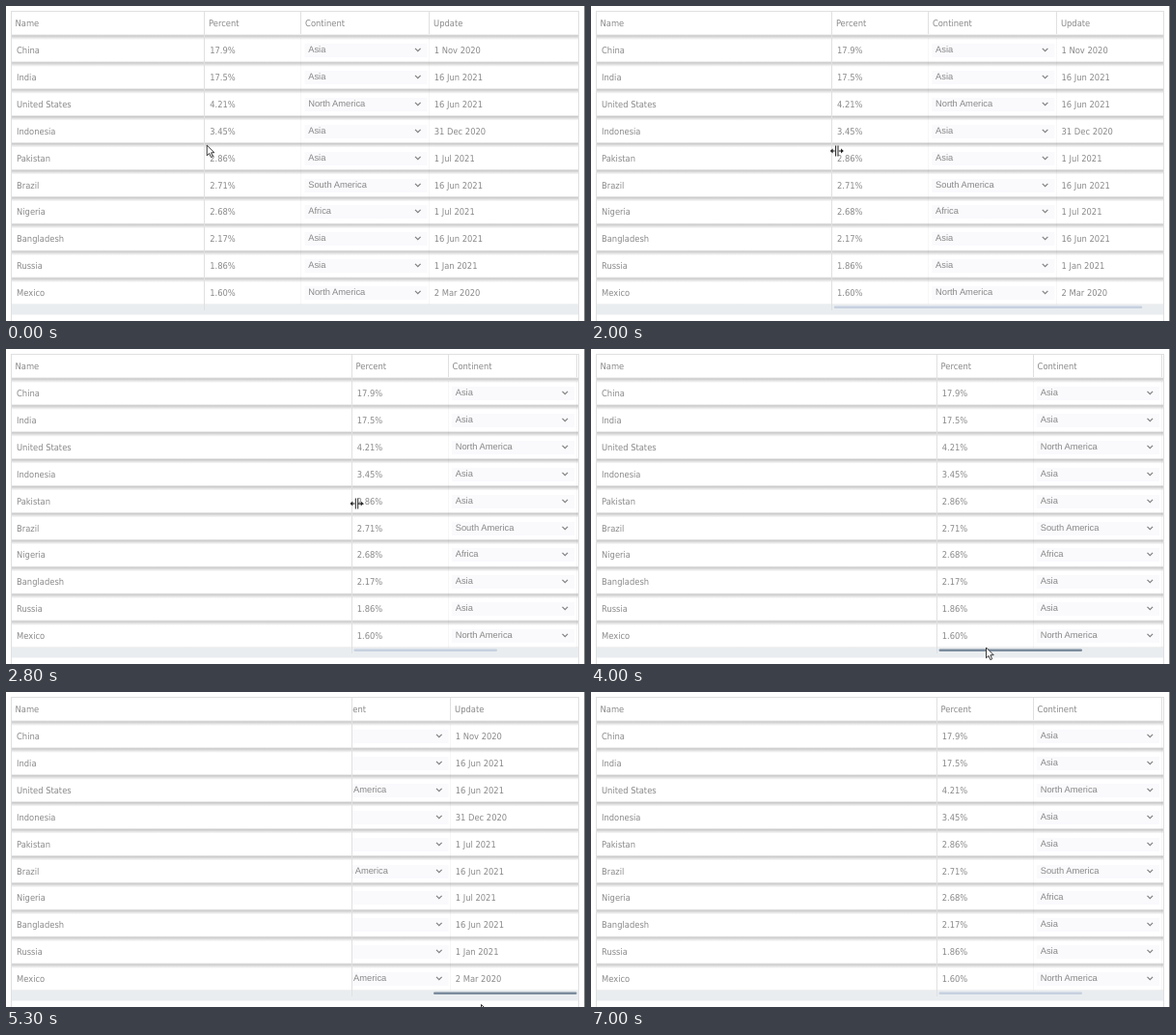
An HTML page with a canvas that plays this animation: 600 px wide and 326 px high, repeating every 7100 ms.

```html
<!DOCTYPE html>
<html lang="en">
<head>
<meta charset="utf-8">
<title>Resizable table</title>
<style>
  html, body { margin: 0; width: 100%; height: 100%; overflow: hidden; background: #fff; }
  canvas { display: block; }
</style>
</head>
<body>
<canvas id="stage" width="600" height="326"></canvas>
<script>
const ctx = document.getElementById("stage").getContext("2d");
const LOOP = 7100, STEP = 100;
const LEFT = 5, RIGHT = 593, TOP = 5, HEAD_BOTTOM = 30, ROW = 27.9, TRACK_Y = 309;
const CONTINENT = 100, UPDATE = 233, CONTENT = 365.5;   // widths measured from the divider
const DIVIDER_START = 205.5, DIVIDER_END = 358;
const MAX_SCROLL = DIVIDER_END + CONTENT - RIGHT;
const CELL_FONT = '9.3px "DejaVu Sans Condensed", "Noto Sans", sans-serif';
const SELECT_FONT = '9.33px "Liberation Sans", Arial, sans-serif';
const TEXT = "#898989", LINE = "#e0e0e0", CURSOR = "#222";

const rows = [
  ["China", "17.9%", "Asia", "1 Nov 2020"],
  ["India", "17.5%", "Asia", "16 Jun 2021"],
  ["United States", "4.21%", "North America", "16 Jun 2021"],
  ["Indonesia", "3.45%", "Asia", "31 Dec 2020"],
  ["Pakistan", "2.86%", "Asia", "1 Jul 2021"],
  ["Brazil", "2.71%", "South America", "16 Jun 2021"],
  ["Nigeria", "2.68%", "Africa", "1 Jul 2021"],
  ["Bangladesh", "2.17%", "Asia", "16 Jun 2021"],
  ["Russia", "1.86%", "Asia", "1 Jan 2021"],
  ["Mexico", "1.60%", "North America", "2 Mar 2020"]
];

// Smooth progress from 0 to 1 between two times
function ease(t, start, end) {
  const k = Math.min(1, Math.max(0, (t - start) / (end - start)));
  return k * k * (3 - 2 * k);
}

const mix = (a, b, k) => a + (b - a) * k;
const rowY = i => Math.round(46 + ROW * i);

function text(str, x, y, font = CELL_FONT) {
  ctx.font = font;
  ctx.textRendering = "geometricPrecision";
  ctx.fillStyle = TEXT;
  ctx.fillText(str, x, y);
}

function rect(x, y, w, h, color) {
  ctx.fillStyle = color;
  ctx.fillRect(x, y, w, h);
}

const vLine = (x, y0, y1, color = LINE) => rect(Math.floor(x), y0, 1, y1 - y0, color);

function shadow(y) {
  const fade = ctx.createLinearGradient(0, y - 1, 0, y + 5);
  fade.addColorStop(0, "#fff");
  fade.addColorStop(0.3, "#cacaca");
  fade.addColorStop(0.5, "#dadada");
  fade.addColorStop(1, "#fff");
  rect(LEFT + 1, y - 1, RIGHT - LEFT, 6, fade);
}

function chevron(x, y) {
  ctx.beginPath();
  ctx.moveTo(x - 2.8, y - 1.4);
  ctx.lineTo(x, y + 1.4);
  ctx.lineTo(x + 2.8, y - 1.4);
  ctx.strokeStyle = "#808080";
  ctx.lineWidth = 1.2;
  ctx.stroke();
}

function scrollingColumns(x) {
  text("Percent", x + 4.6, 21.3);
  text("Continent", x + CONTINENT + 4.6, 21.3);
  text("Update", x + UPDATE + 4.6, 21.3);
  for (const offset of [CONTINENT, UPDATE]) {
    vLine(x + offset, TOP, 29);
    vLine(x + offset, 33, TRACK_Y, "rgba(0,0,0,.03)");
  }
  rows.forEach(([, percent, continent, update], i) => {
    const y = rowY(i);
    rect(x + 104, y - 7, 127, 14, "#faf9fc");
    text(percent, x + 5.7, y + 3.4);
    text(continent, x + 107.7, y + 2.4, SELECT_FONT);
    chevron(x + 221.3, y - 0.8);
    text(update, x + UPDATE + 5.2, y + 3.4);
  });
}

function scrollbar(divider, scroll, active) {
  const view = RIGHT - divider;
  if (view >= CONTENT) return;
  const start = divider + 2.5, length = RIGHT - 1.5 - start;
  ctx.beginPath();
  ctx.roundRect(start + length * scroll / CONTENT, 310.4, length * view / CONTENT, 2.6, 1.3);
  ctx.fillStyle = active ? "#7c8c9d" : "#c6d1df";
  ctx.fill();
}

function polygon(points) {
  ctx.beginPath();
  points.forEach(([x, y]) => ctx.lineTo(x, y));
  ctx.closePath();
}

function arrowCursor(x, y) {
  ctx.save();
  ctx.translate(x, y);
  polygon([[0.5, 0], [0.5, 10.8], [3, 8.5], [4.8, 12.6], [6.7, 11.8], [4.9, 7.8], [8.2, 7.7]]);
  ctx.fillStyle = "#fff";
  ctx.fill();
  ctx.strokeStyle = CURSOR;
  ctx.lineWidth = 0.9;
  ctx.stroke();
  ctx.restore();
}

function resizeCursor(x, y) {
  ctx.save();
  ctx.translate(x, y);
  for (const side of [-1, 1]) {
    rect(side * 1.2 - 0.5, -5.5, 1, 11, CURSOR);
    rect(side * 3.5 - 1.5, -0.5, 3, 1, CURSOR);
    polygon([[side * 7, 0], [side * 4.2, -2.6], [side * 4.2, 2.6]]);
    ctx.fill();
  }
  ctx.restore();
}

function cursor(t, divider, drag, scrolled) {
  if (t < 400) {
    arrowCursor(207.7, 144);
  } else if (t >= 600 && t < 1700) {
    resizeCursor(mix(215, 205, ease(t, 900, 1200)), 144.5);
  } else if (t >= 1700 && t < 2900) {
    resizeCursor(divider + 5.5, mix(146, 160, drag));
  } else if (t >= 2900 && t < 6000) {
    const approach = ease(t, 2900, 3800), leave = ease(t, 5700, 6000);
    arrowCursor(mix(362, 409, approach) + 83 * scrolled - 45 * leave,
                mix(158, 309, approach) + 14.5 * scrolled - 13 * leave);
  }
}

function draw(t) {
  const drag = ease(t, 1600, 2730);
  const scrolled = ease(t, 4200, 5000) - ease(t, 5300, 5800);
  const divider = mix(DIVIDER_START, DIVIDER_END, drag), scroll = MAX_SCROLL * scrolled;

  rect(0, 0, 600, 326, "#fff");
  for (let i = 0; i <= rows.length; i++) shadow(HEAD_BOTTOM + ROW * i);

  ctx.save();
  ctx.beginPath();
  ctx.rect(divider, 0, RIGHT - divider, 326);
  ctx.clip();
  scrollingColumns(divider - scroll);
  ctx.restore();

  text("Name", LEFT + 4.5, 21.3);
  rows.forEach(([name], i) => text(name, LEFT + 6, rowY(i) + 3.4));

  rect(LEFT + 1, TRACK_Y, RIGHT - LEFT, 10.5, "#e9edf0");
  vLine(divider, TOP, 315);
  scrollbar(divider, scroll, t >= 3800 && t < 5800);

  rect(LEFT, TOP, RIGHT - LEFT + 1, 1, LINE);
  vLine(LEFT, TOP, 326);
  vLine(RIGHT, TOP, 326);
  vLine(599, 0, 326, "#888");
  cursor(t, divider, drag, scrolled);
}

function tick() {
  const t = performance.now() % LOOP;
  draw(Math.floor(t / STEP) * STEP);
  requestAnimationFrame(tick);
}
tick();
</script>
</body>
</html>
```
